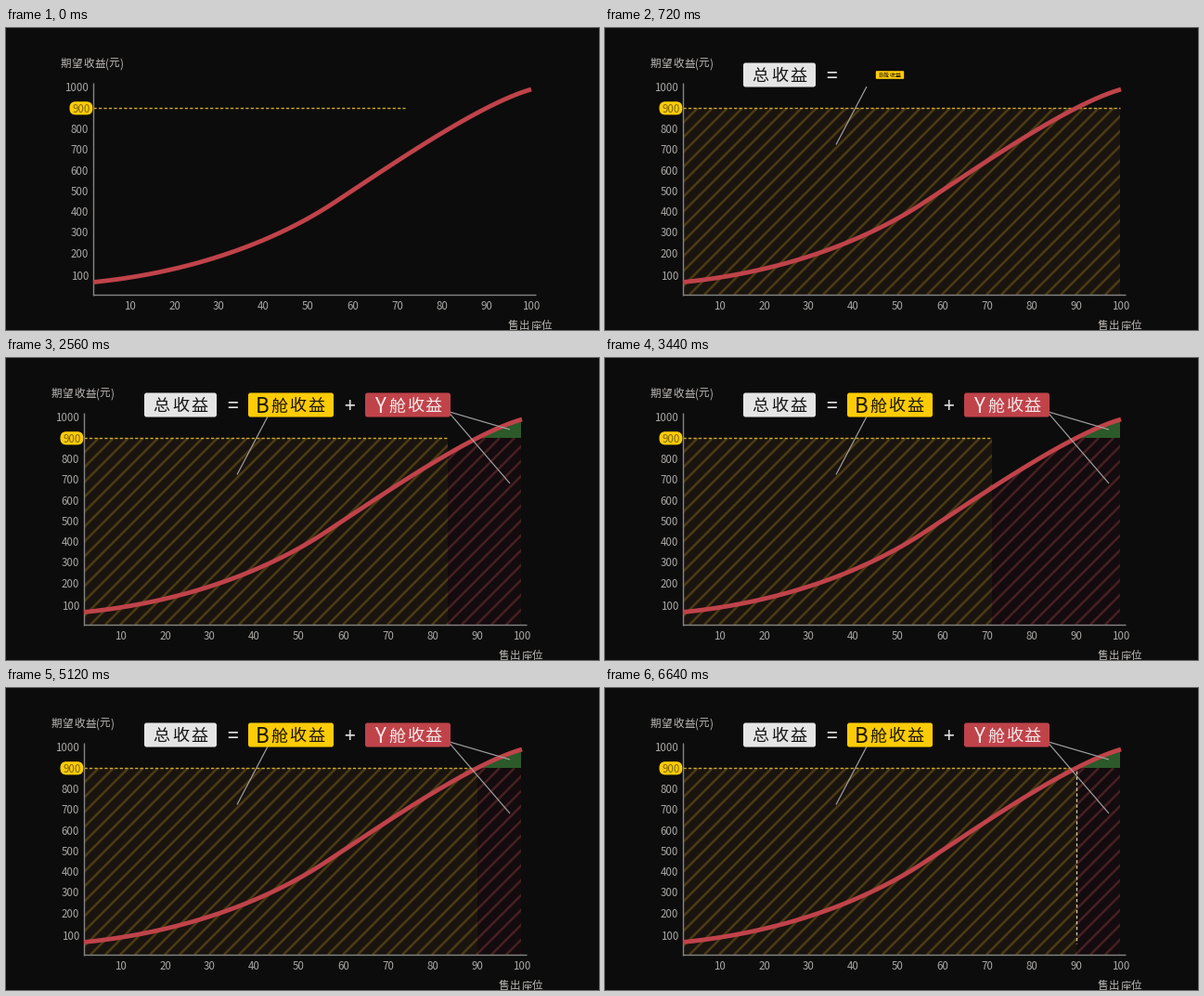
Write a matplotlib script that moves like this. It is 639x325 px and loops after 6720 ms.

```python
import numpy as np
import matplotlib.pyplot as plt
from matplotlib.animation import FuncAnimation
from matplotlib.collections import LineCollection
from matplotlib.patches import FancyBboxPatch, Polygon

W, H, DPI = 639, 325, 64
LOOP, STEP = 6720, 80
FONT = "Noto Sans CJK JP"
PX = 72 / DPI  # points per pixel

BG = "#0c0c0c"
GREY = "#a9a7a5"
PALE = "#bdbab7"
YELLOW = "#fecc06"
RED = "#c0434a"
GREEN = "#2c5a2a"

LEFT, RIGHT, TOP, BASE = 84, 555, 86, 287
PITCH = 16  # horizontal distance between stripes

# Pictures are held for 160 ms, with a few short ones of 80 ms.
SHORT = {320, 1840, 3040, 4240, 5440, 6640}
STARTS = [0]
while STARTS[-1] < LOOP:
    STARTS.append(STARTS[-1] + (80 if STARTS[-1] in SHORT else 160))

fig = plt.figure(figsize=(W / DPI, H / DPI), dpi=DPI, facecolor=BG)
ax = fig.add_axes([0, 0, 1, 1])


def bezier(*points):
    a, b, c, d = np.array(points, float)
    u = np.linspace(0, 1, 80)[:, None]
    v = 1 - u
    return a * v**3 + 3 * b * v * v * u + 3 * c * v * u * u + d * u**3


CURVE = np.vstack([
    bezier((84, 273.5), (190, 263), (280, 230), (345, 187)),
    bezier((345, 187), (405, 147.5), (500, 82), (556, 66)),
])


def curve(x):
    return np.interp(x, CURVE[:, 0], CURVE[:, 1])


def ramp(t, a, b):
    return float(np.clip((t - a) / (b - a), 0, 1))


def ease(t, a, b):
    u = ramp(t, a, b)
    return u * u * (3 - 2 * u)


def text(x, y, s, size, color, ha="center"):
    ax.text(x, y + 0.375 * size, s, fontsize=size * PX, color=color, ha=ha,
            va="baseline", family=FONT, zorder=6)


def line(xs, ys, color, width, z=3, **style):
    ax.plot(xs, ys, color=color, lw=width * PX, zorder=z,
            solid_capstyle="butt", dash_capstyle="butt", **style)


def box(x0, y0, x1, y1, radius, color):
    ax.add_patch(FancyBboxPatch(
        (x0 + radius, y0 + radius), x1 - x0 - 2 * radius, y1 - y0 - 2 * radius,
        boxstyle=f"round,pad={radius}", fc=color, ec="none", zorder=5))


def label(x0, x1, chars, centers, fill, ink, scale):
    """Rounded caption that grows from its centre."""
    if scale < 0.03:
        return
    cx, cy = (x0 + x1) / 2, 50.5
    hw, hh = (x1 - x0) / 2 * scale, 13 * scale
    box(cx - hw, cy - hh, cx + hw, cy + hh, 2.5 * scale, fill)
    for ch, x in zip(chars, centers):
        size = 22.5 if ch.isascii() else 18
        text(cx + (x - cx) * scale, cy, ch, size * scale, ink)


def sign(x, s, scale):
    if scale > 0.03:
        text(x, 50.8, s, 21 * scale, "#e4e4e4")


def hatch(corners, fill, stroke, alpha=1):
    if alpha <= 0:
        return
    area = Polygon(corners, fc=fill, ec="none", alpha=alpha, zorder=1)
    ax.add_patch(area)
    sums = range(LEFT + TOP, RIGHT + BASE + PITCH, PITCH)
    stripes = LineCollection([[(c - TOP, TOP), (c - BASE, BASE)] for c in sums],
                             colors=stroke, linewidths=2.6 * PX,
                             alpha=alpha, zorder=1.2)
    ax.add_collection(stripes, autolim=False)
    stripes.set_clip_path(area)


def leader(start, end, u):
    if u > 0:
        (x0, y0), (x1, y1) = start, end
        line([x0, x0 + (x1 - x0) * u], [y0, y0 + (y1 - y0) * u], "#a0a0a0", 1.2, 4)


def draw_axes(dx):
    line([LEFT + dx] * 2, [59, BASE + 0.5], "#858585", 1.4)
    line([LEFT + dx, 561 + dx], [BASE] * 2, "#858585", 1.4)
    for k in range(1, 11):
        text(75.5 + 48 * k + dx, 299, str(10 * k), 11.5, GREY)
        y = 267 if k == 1 else 64 + 22.3 * (10 - k)
        if k != 9:
            text(79 + dx, y, str(100 * k), 11.5, GREY, "right")
    box(58.5 + dx, 79.2, 83.3 + dx, 93.4, 6.5, YELLOW)
    text(71.3 + dx, 86.4, "900", 11.5, "#7d6610")
    for ch, x in zip("期望收益(元)", (54.5, 66.7, 79, 91.2, 99, 106.3, 114.5)):
        text(x + dx, 38, ch, 11.5, PALE)
    for ch, x in zip("售出座位", (536.5, 548.7, 561, 573)):
        text(x + dx, 320, ch, 11.5, PALE)


def draw(i):
    t = max(s for s in STARTS if s <= i * STEP)
    ax.clear()
    ax.set_xlim(0, W)
    ax.set_ylim(H, 0)
    ax.axis("off")

    dx = 10 * (1 - ease(t, 0, 320))
    split = float(np.interp(t, [1330, 2560, 3440, 4320, 4880],
                            [RIGHT, 476, 417, 472, 508]))

    # Areas below the price level
    hatch([(LEFT + dx, TOP), (split + dx, TOP), (split + dx, BASE), (LEFT + dx, BASE)],
          "#1a140f", "#4b3a15", ramp(t, 60, 380))
    if split < RIGHT:
        xs = np.linspace(split, RIGHT, 60)
        roof = np.maximum(curve(xs), TOP)
        hatch([*zip(xs, roof), (RIGHT, BASE), (split, BASE)], "#130b0d", "#452022")
        xs = np.linspace(max(split, 508), RIGHT, 40)
        ys = np.minimum(curve(xs), TOP)
        ax.add_patch(Polygon([*zip(xs, ys), (RIGHT, TOP), (xs[0], TOP)],
                             fc=GREEN, ec="none", zorder=2))

    reach = 0.713 + 0.287 * ramp(t, 0, 240)
    end = min(split, LEFT + (RIGHT - LEFT) * reach)
    line([LEFT + dx, end + dx], [TOP + 0.3] * 2, "#d2af22", 1.4, 2.5,
         ls=(0, (2.3, 1.6)))

    draw_axes(dx)
    line(CURVE[:, 0] + dx, CURVE[:, 1], RED, 4.8, 3.5)

    drop = ramp(t, 6080, 6680)
    if drop > 0:
        line([508, 508], [89, 89 + 199 * drop], "#d9cfae", 1.3, 4,
             ls=(0, (2.6, 2.0)))

    leader((249, 125.5), (282, 63), ramp(t, 360, 690))
    u = ramp(t, 1680, 2050)
    leader((543, 77), (478, 58), u)
    leader((543, 135), (478, 59.5), u)

    label(149, 227, "总收益", (167, 188, 208.5), "#e6e5e6", "#151515",
          ease(t, 200, 400))
    sign(244, "=", ramp(t, 380, 580))
    label(261, 353, "B舱收益", (276.5, 294.5, 314.5, 334.5), YELLOW, "#1c1606",
          ease(t, 620, 880))
    sign(370.5, "+", ramp(t, 1860, 2060))
    label(387, 479, "Y舱收益", (403, 421, 441, 460.5), RED, "#f6eaea",
          ease(t, 1980, 2240))
    return []


anim = FuncAnimation(fig, draw, frames=LOOP // STEP, interval=STEP,
                     init_func=lambda: [], repeat=True, repeat_delay=0)
plt.show()
```
